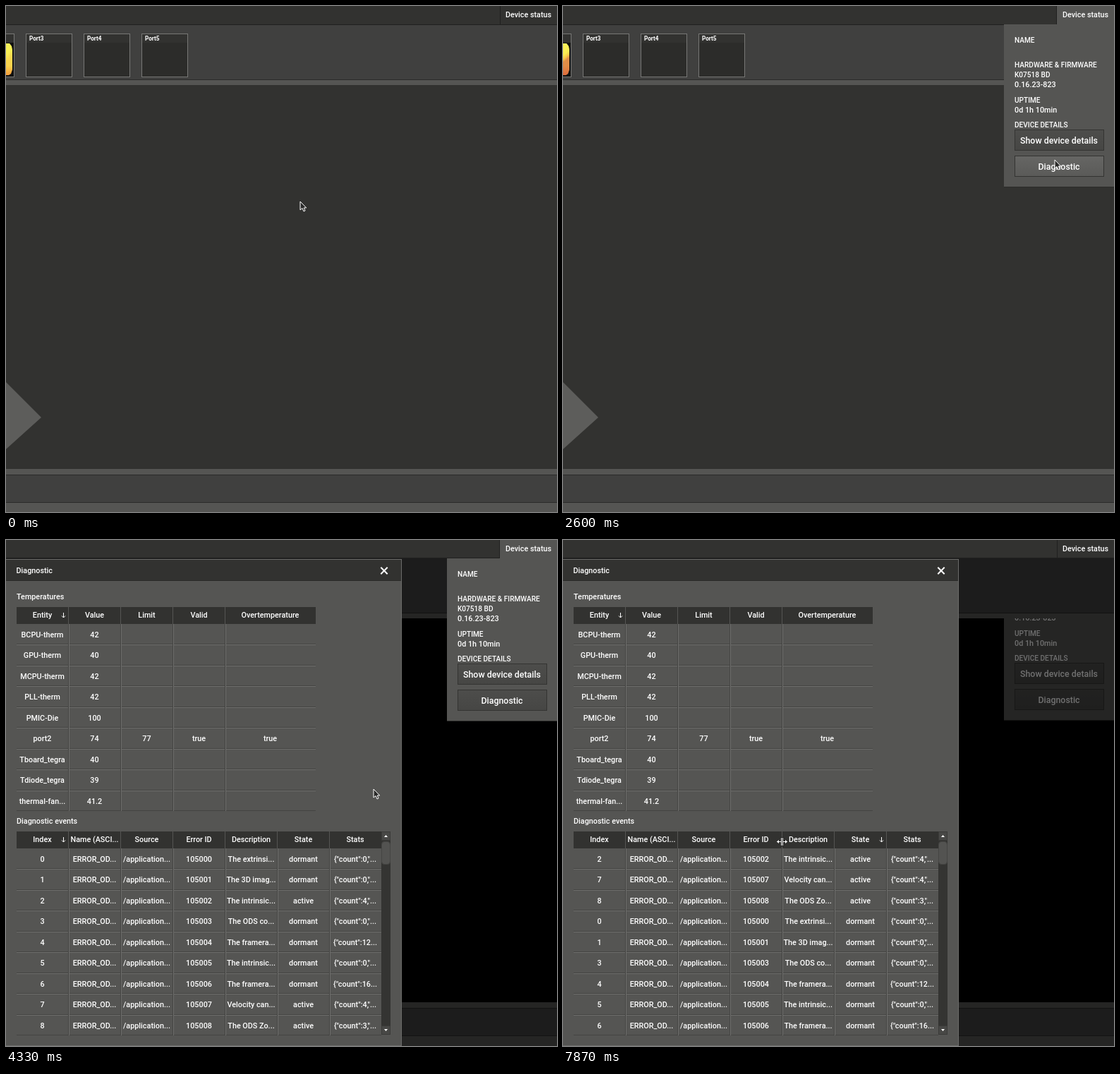
These frames come from a looping animation (781x717 px, 8 s). An HTML page with a canvas:

```html
<!DOCTYPE html>
<html lang="en">
<head>
<meta charset="utf-8">
<title>Device diagnostic</title>
<style>
html, body { margin: 0; width: 100%; height: 100%; overflow: hidden; background: #323230; }
canvas { display: block; }
</style>
</head>
<body>
<canvas id="stage" width="781" height="717"></canvas>
<script>
const g = document.getElementById('stage').getContext('2d');
const LOOP = 8000, TICK = 1000 / 15;
const DARK = '#323230', BAR = '#40403f', MID = '#555553', LIGHT = '#6e6e6c', SHADE = '#444442';

// Pointer path: tick, x, y
const PATH = [
  [0, 417, 277], [4, 500, 215], [8, 630, 125], [12, 710, 62], [13, 710, 62],
  [17, 729, 28], [20, 734, 12], [23, 734, 12], [28, 722, 95], [32, 704, 180],
  [34, 699, 208], [36, 697, 217], [39, 697, 218], [47, 698, 224], [60, 698, 224],
  [61, 665, 248], [62, 614, 285], [63, 614, 285], [64, 568, 318], [65, 521, 353],
  [66, 521, 354], [71, 417, 423], [100, 417, 423], [107, 355, 429], [113, 312, 427],
  [114, 312, 427], [115, 303, 425], [118, 310, 427], [120, 310, 427]
];

const TEMPS = [
  ['BCPU-therm', '42'], ['GPU-therm', '40'], ['MCPU-therm', '42'], ['PLL-therm', '42'],
  ['PMIC-Die', '100'], ['port2', '74', '77', 'true', 'true'], ['Tboard_tegra', '40'],
  ['Tdiode_tegra', '39'], ['thermal-fan...', '41.2']
];
const TEMP_HEAD = ['Entity', 'Value', 'Limit', 'Valid', 'Overtemperature'];
const EVENT_HEAD = ['Index', 'Name (ASCI...', 'Source', 'Error ID', 'Description', 'State', 'Stats'];
const ABOUT = ['The extrinsi...', 'The 3D imag...', 'The intrinsic...', 'The ODS co...',
  'The framera...', 'The intrinsic...', 'The framera...', 'Velocity can...', 'The ODS Zo...'];
const COUNTS = [0, 0, 4, 0, 12, 0, 16, 4, 3];
const ACTIVE = [2, 7, 8];
const EVENTS = ABOUT.map((about, i) => [
  String(i), 'ERROR_OD...', '/application...', String(105000 + i), about,
  ACTIVE.includes(i) ? 'active' : 'dormant',
  '{"count":' + COUNTS[i] + (COUNTS[i] > 9 ? '...' : ',"...')
]);
const SORTED = [...EVENTS].sort((a, b) => a[5].localeCompare(b[5]));

function rect(x, y, w, h, fill, line) {
  g.fillStyle = fill;
  g.fillRect(x, y, w, h);
  if (line) {
    g.strokeStyle = line;
    g.lineWidth = 1;
    g.strokeRect(x + .5, y + .5, w - 1, h - 1);
  }
}

function text(s, x, y, size = 10.8, align = 'left', color = '#fff', weight = 500) {
  g.font = `${weight} ${size}px Roboto, sans-serif`;
  g.textAlign = align;
  g.fillStyle = color;
  g.fillText(s, x, Math.round(y + size * .355));
}

function shape(points, fill) {
  g.beginPath();
  points.forEach(([x, y]) => g.lineTo(x, y));
  g.closePath();
  if (fill) { g.fillStyle = fill; g.fill(); }
}

function clipped(x, y, w, h, draw) {
  g.save();
  g.beginPath();
  g.rect(x, y, w, h);
  g.clip();
  draw();
  g.restore();
}

function cross(x, y, color) {
  g.strokeStyle = color;
  g.lineWidth = 2;
  g.beginPath();
  g.moveTo(x - 4.7, y - 4.7); g.lineTo(x + 4.7, y + 4.7);
  g.moveTo(x + 4.7, y - 4.7); g.lineTo(x - 4.7, y + 4.7);
  g.stroke();
}

function sortMark(x, y) {
  g.strokeStyle = '#fff';
  g.lineWidth = 1;
  g.beginPath();
  g.moveTo(x + .5, y - 3); g.lineTo(x + .5, y + 4);
  g.moveTo(x - 2, y + 1.5); g.lineTo(x + .5, y + 4); g.lineTo(x + 3, y + 1.5);
  g.stroke();
}

// Vertical or horizontal scrollbar, 13 px thick
function scroll(x, y, len, from, size, across) {
  const w = across ? len : 13, h = across ? 13 : len;
  rect(x, y, w, h, '#343432');
  for (const end of [0, len - 13]) {
    const bx = across ? x + end : x, by = across ? y : y + end;
    rect(bx, by, 13, 13, '#484846', '#3a3a38');
    const cx = bx + 6.5, cy = by + 6.5, d = end ? 1.5 : -1.5;
    shape(across ? [[cx + d, cy], [cx - d, cy - 2.5], [cx - d, cy + 2.5]]
                 : [[cx, cy + d], [cx - 2.5, cy - d], [cx + 2.5, cy - d]], '#fff');
  }
  g.fillStyle = '#535351';
  g.strokeStyle = '#454543';
  g.lineWidth = 1;
  g.beginPath();
  if (across) g.roundRect(x + from + .5, y + .5, size - 1, 12, 4);
  else g.roundRect(x + .5, y + from + .5, 12, size - 1, 4);
  g.fill();
  g.stroke();
}

function table(y, edges, head, rows, sortCol) {
  const left = edges[0], right = edges[edges.length - 1];
  const mid = c => (edges[c] + edges[c + 1]) / 2 - .5;
  rect(left, y, right - left, 24, DARK);
  head.forEach((h, c) => {
    text(h, mid(c), y + 11.5, 10.8, 'center');
    if (c) rect(edges[c] - 1, y, 1, 24, MID);
  });
  sortMark(edges[sortCol] + 66, y + 11);
  rows.forEach((row, r) => {
    row.forEach((s, c) => text(s, mid(c), y + 38.7 + r * 29.55, 10.8, 'center'));
    const ly = Math.floor(y + 24 + (r + 1) * 29.55) - 1;
    rect(left, ly, right - left, 1, SHADE);
    if (r < rows.length - 1) rect(left, ly + 1, right - left, 1, LIGHT);
  });
  if (rows.length)
    edges.slice(1, -1).forEach(x => {
      rect(x - 1, y + 24, 1, 265, SHADE);
      rect(x, y + 24, 1, 265, LIGHT);
    });
}

function heat(tick) {
  clipped(0, 40, 11, 60, () => {
    rect(0, 40, 11, 60, '#111110');
    rect(0, 40, 11, 12, DARK);
    const wave = Math.sin(tick * 12.9898) * 43758.5453;
    const j = wave - Math.floor(wave);
    const grad = g.createLinearGradient(0, 58, 11, 68 + 4 * j);
    grad.addColorStop(0, '#fff05a');
    grad.addColorStop(.55, '#fbe84e');
    grad.addColorStop(.8, '#f6a23c');
    grad.addColorStop(1, j > .6 ? '#c8323c' : '#ef7a3a');
    const low = g.createLinearGradient(0, 52, 2, 99);
    low.addColorStop(0, '#f4f55a');
    low.addColorStop(.7, '#fdea52');
    low.addColorStop(1, '#f4a03c');
    const outline = [[0, 53], [5, 53], [8, 57], [9, 62], [9, 90], [7, 96], [4, 98], [0, 98]];
    shape(outline, low);
    g.globalAlpha = .2 + .4 * j;
    shape(outline, grad);
    g.globalAlpha = 1;
  });
  rect(11, 40, 1, 60, '#777775');
  rect(0, 39, 12, 1, '#777775');
  rect(0, 100, 12, 1, '#777775');
}

function base(tick) {
  rect(0, 0, 781, 718, DARK);
  rect(0, 26, 781, 1, '#20201f');
  rect(0, 27, 781, 77, BAR);
  rect(0, 104, 781, 1, '#2a2a29');
  rect(0, 105, 781, 7, MID);
  rect(0, 656, 781, 8, MID);
  rect(0, 664, 781, 39, BAR);
  rect(0, 664, 781, 1, '#2a2a29');
  rect(0, 703, 781, 1, '#2a2a29');
  rect(0, 704, 781, 14, MID);
  rect(700, 0, 1, 26, '#20201f');
  heat(tick);
  for (let i = 0; i < 3; i++) {
    const x = 28 + 82 * i;
    rect(x, 39, 66, 62, '#2c2c2a', '#777775');
    rect(x + 1, 40, 64, 12, DARK);
    text('Port' + (i + 3), x + 5, 46.5, 8.2, 'left', '#fff', 700);
  }
  shape([[0, 533], [50, 583], [0, 628]], '#5d5d5b');
}

function button(s, y, hot) {
  const fill = g.createLinearGradient(0, y, 0, y + 30);
  fill.addColorStop(0, hot ? '#666664' : '#4d4d4b');
  fill.addColorStop(1, hot ? '#5a5a58' : '#464644');
  rect(640, y, 127, 30, fill, '#343432');
  text(s, 703, y + 15.5, 12.4, 'center');
}

function popup(x, y) {
  const over = top => x >= 640 && x < 766 && y >= top && y < top + 30;
  rect(625, 26, 156, 231, MID);
  rect(625, 256, 156, 1, '#2c2c2a');
  const lines = [['NAME', 48], ['HARDWARE & FIRMWARE', 83.5], ['K07518 BD', 97.5],
    ['0.16.23-823', 111.5], ['UPTIME', 133], ['0d 1h 10min', 147], ['DEVICE DETAILS', 168.5]];
  lines.forEach(([s, ly]) => text(s, 640, ly, /[a-z]|-/.test(s) ? 10.8 : 10.1));
  button('Show device details', 175, over(175));
  button('Diagnostic', 212, over(212));
}

function tab() {
  rect(699, 0, 82, 27, MID);
  rect(699, 0, 1, 26, '#20201f');
}

function frame(x, y, w, h, title) {
  rect(x, y, w, h, MID, '#6c6c6a');
  rect(x + 1, y + 1, w - 2, 29, DARK);
  rect(x + 1, y + 30, w - 2, 1, '#292928');
  text(title, x + 15, y + 16);
}

const columns = (x, n, last) => [...Array.from({ length: n }, (_, i) => x + 74 * i), last];

function dialog(settled, sorted) {
  frame(-1, 27, 562, 690, '');
  text('Diagnostic', 14.5, 43.5);
  cross(536, 43.5, '#fff');
  text('Temperatures', 15, 80.5);
  table(95, columns(15, 5, settled ? 439 : 426), TEMP_HEAD, TEMPS, 0);
  if (!settled) scroll(426, 95, 288, 14, 260);
  const y = settled ? 413 : 412;
  text('Diagnostic events', 15, y - 14.5);
  table(y, columns(15, 7, 532), EVENT_HEAD, sorted ? SORTED : EVENTS, sorted ? 5 : 0);
  scroll(532, y, 288, 14, 33);
}

function opening() {
  g.globalAlpha = .1;
  clipped(0, 112, 561, 544, () => dialog(true, false));
  g.globalAlpha = 1;
  rect(53, 152, 455, 442, '#222221', '#343433');
  rect(54, 153, 453, 29, '#191918');
  rect(468, 153, 30, 29, '#282827');
  text('Device details', 68, 168, 10.8, 'left', '#787877');
  cross(483, 168, '#858584');
  text('Hardware information', 75, 211, 10.6, 'left', '#737372');
  rect(75, 222, 411, 316, '#222221', '#30302f');
  text('MACAddress:', 90, 236, 12, 'left', '#737372');
  rect(426, 542, 60, 30, '#1d1d1c', '#151514');
  text('Save', 456, 557.5, 12, 'center', '#737372');

  frame(53, 243, 455, 259, 'Diagnostic');
  cross(483, 259, '#fff');
  text('Temperatures', 68, 296);
  table(310, [68, 143], ['Entity'], [], 0);
  scroll(68, 371, 75, 14, 15, true);
  text('Diagnostic events', 68, 398.5);
  clipped(68, 405, 424, 40, () =>
    table(413, columns(68, 6, 512), EVENT_HEAD.slice(0, 6), [], 0));
  scroll(68, 474, 424, 14, 325, true);
}

function arrow(x, y) {
  shape([[0, 0], [0, 12], [3, 9.5], [5, 14], [7, 13], [5.2, 9], [8.7, 9]]
    .map(([a, b]) => [x + a, y + b]), '#2a2a29');
  g.strokeStyle = '#fff';
  g.lineWidth = 1;
  g.stroke();
}

function resizer(x, y) {
  rect(x - 2, y - 6, 5, 13, '#222221');
  rect(x - 7, y - 1, 15, 3, '#222221');
  rect(x - 1, y - 5, 1, 11, '#fff');
  rect(x + 1, y - 5, 1, 11, '#fff');
  rect(x - 7, y, 6, 1, '#fff');
  rect(x + 2, y, 6, 1, '#fff');
  for (const d of [-1, 1])
    shape([[x + .5 + 7.5 * d, y + .5], [x + .5 + 4.5 * d, y - 2], [x + .5 + 4.5 * d, y + 3]], '#fff');
}

function pointer(tick) {
  const i = Math.max(1, PATH.findIndex(p => p[0] >= tick));
  const [t0, x0, y0] = PATH[i - 1], [t1, x1, y1] = PATH[i];
  const k = (tick - t0) / (t1 - t0);
  return [Math.round(x0 + (x1 - x0) * k), Math.round(y0 + (y1 - y0) * k)];
}

// Page behind the dialog; it sits one pixel higher once the dialog is full size
function backdrop(tick) {
  g.save();
  if (tick >= 52) g.translate(0, -1);
  base(Math.min(tick, 50));
  if (tick >= 50) {
    rect(0, 112, 781, 544, '#000');
    if (tick >= 80) clipped(625, 112, 156, 146, () => popup(0, 0));
    rect(0, 27, 781, 691, 'rgba(0,0,0,.56)');
  }
  g.restore();
}

function draw(ms) {
  const tick = Math.floor((ms + 4) / TICK);
  const [x, y] = pointer(tick);
  backdrop(tick);
  if (tick >= 52) dialog(tick >= 54, tick >= 80);
  else if (tick >= 50) opening();
  if (tick >= 22 && tick < 80) {
    popup(x, y);
    tab();
  }
  text('Device status', 740.5, 12.5, 10.8, 'center');
  if (tick >= 113 && Math.abs(x - 310) < 6) resizer(x, y);
  else arrow(x, y);
}

const start = performance.now();
function loop() {
  draw((performance.now() - start) % LOOP);
  requestAnimationFrame(loop);
}
loop();
</script>
</body>
</html>
```
